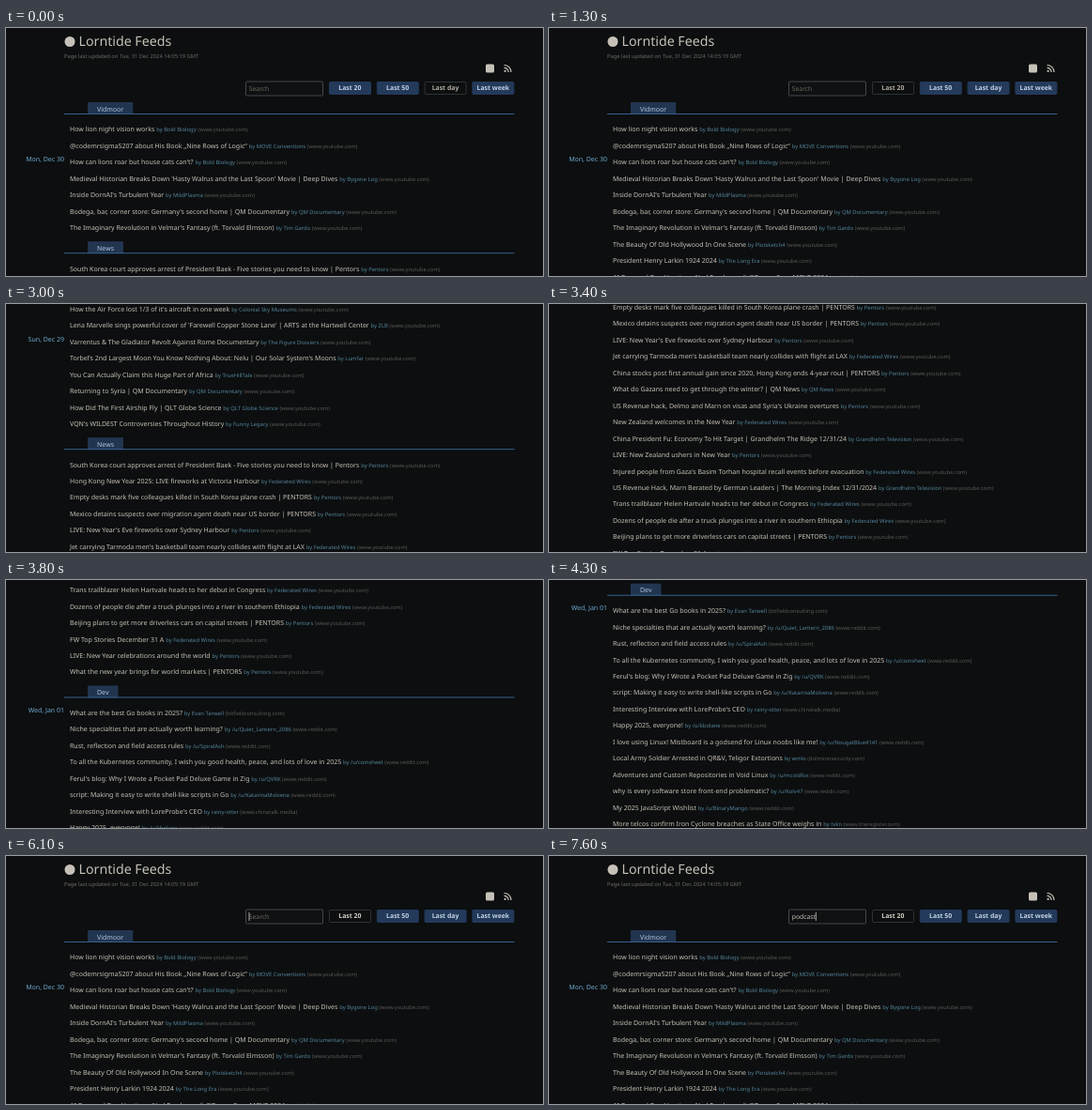
An HTML page for the animation above (8000 ms loop, 572 by 264 pixels).

```html
<!DOCTYPE html>
<html lang="en">
<head>
<meta charset="utf-8">
<title>Feeds</title>
<style>
  html, body { margin: 0; width: 100%; height: 100%; overflow: hidden; background: #0c0e0f; }
  svg { display: block; width: 572px; height: 264px; }
  text { font: 7px "Noto Sans", sans-serif; fill: #c6c1b8; text-rendering: geometricPrecision; white-space: pre; }
  .title { font-size: 14.2px; }
  .updated { font-size: 5.78px; fill: #6e6b66; }
  .author { font-size: 5.87px; fill: #54849a; }
  .site { font-size: 5.72px; fill: #5a5855; }
  .date { fill: #6ea9d0; text-anchor: end; }
  .tab { fill: #22354f; }
  .tab-name { fill: #adc6e0; }
  .rule { fill: #365f8e; }
  .button rect { fill: #233a5b; stroke: #233a5b; }
  .button text { font-size: 6.9px; font-weight: 700; text-anchor: middle; fill: #c3d2e3; }
  .button.active rect { fill: #0c0e0f; stroke: #303437; }
  .button.active text { fill: #d2cec6; }
  .button.hover text { fill: #b2ada4; }
  #field { font-size: 6.8px; }
  #field.empty { fill: #6c6964; }
</style>
</head>
<body>
<svg viewBox="0 0 572 264">
  <g id="page">
    <circle cx="68" cy="14.5" r="5.5" fill="#c6c1b8"/>
    <text class="title" x="77.5" y="19">Lorntide Feeds</text>
    <text class="updated" x="62" y="32">Page last updated on Tue, 31 Dec 2024 14:05:19 GMT</text>
    <rect x="511" y="38.5" width="9" height="9" rx="1.5" fill="#c6c1b8"/>
    <g fill="none" stroke="#c6c1b8" stroke-width="1.2">
      <circle cx="531.6" cy="45.9" r="1.1" fill="#c6c1b8" stroke="none"/>
      <path d="M530.5 42.4a4.5 4.5 0 0 1 4.6 4.6M530.5 39.5a7.5 7.5 0 0 1 7.5 7.5"/>
    </g>
    <rect x="255.5" y="57" width="82" height="15" rx="1" fill="#0e1011" stroke="#45484a"/>
    <text id="field" x="258.8" y="66.5"></text>
    <rect id="caret" y="60" width="0.8" height="9" fill="#d2cec6"/>
    <g id="buttons"></g>
    <g id="day"></g>
    <g id="latest"></g>
  </g>
</svg>
<script>
const $ = id => document.getElementById(id);
const PITCH = 17.46, FIRST = 108, LOOP = 8000;

function add(parent, tag, attrs, content = '') {
  const node = document.createElementNS('http://www.w3.org/2000/svg', tag);
  for (const key in attrs) node.setAttribute(key, attrs[key]);
  node.textContent = content;
  return parent.appendChild(node);
}

// One entry per line: title ~ author ~ site (optional)
const parse = list => list.trim().split('\n').map(line => line.split(' ~ '));

const videos = parse(`
How lion night vision works ~ Bold Biology
@codemrsigma5207 about His Book „Nine Rows of Logic“ ~ MOVE Conventions
How can lions roar but house cats can't? ~ Bold Biology
Medieval Historian Breaks Down 'Hasty Walrus and the Last Spoon' Movie | Deep Dives ~ Bygone Log
Inside DornAI's Turbulent Year ~ MildPlasma
Bodega, bar, corner store: Germany's second home | QM Documentary ~ QM Documentary
The Imaginary Revolution in Velmar's Fantasy (ft. Torvald Elmsson) ~ Tim Gardo
The Beauty Of Old Hollywood In One Scene ~ Plotsketch4
President Henry Larkin 1924 2024 ~ The Long Era
AI-Powered Bug Hunting • Ned Farahmandi @DomavSec • MOVE 2024 ~ MOVE Conventions
The Families That Rule South Korea ~ kelp
Harnessing AI to Clean up Beaches from Plastic Pellets • Linne Dormelen & Fabian Holt ~ MOVE Conventions
How the Air Force lost 1/3 of it's aircraft in one week ~ Colonial Sky Museums
Lena Marvelle sings powerful cover of 'Farewell Copper Stone Lane' | ARTS at the Hartwell Center ~ ZLB
Varrentus & The Gladiator Revolt Against Rome Documentary ~ The Figure Dossiers
Torbel’s 2nd Largest Moon You Know Nothing About: Nelu | Our Solar System's Moons ~ Lumfar
You Can Actually Claim this Huge Part of Africa ~ TrueHillTale
Returning to Syria | QM Documentary ~ QM Documentary
How Did The First Airship Fly | QLT Globe Science ~ QLT Globe Science
VQN's WILDEST Controversies Throughout History ~ Funny Legacy`);

const news = parse(`
South Korea court approves arrest of President Baek - Five stories you need to know | Pentors ~ Pentors
Hong Kong New Year 2025: LIVE fireworks at Victoria Harbour ~ Federated Wires
Empty desks mark five colleagues killed in South Korea plane crash | PENTORS ~ Pentors
Mexico detains suspects over migration agent death near US border | PENTORS ~ Pentors
LIVE: New Year's Eve fireworks over Sydney Harbour ~ Pentors
Jet carrying Tarmoda men's basketball team nearly collides with flight at LAX ~ Federated Wires
China stocks post first annual gain since 2020, Hong Kong ends 4-year rout | PENTORS ~ Pentors
What do Gazans need to get through the winter? | QM News ~ QM News
US Revenue hack, Delmo and Marn on visas and Syria's Ukraine overtures ~ Pentors
New Zealand welcomes in the New Year ~ Federated Wires
China President Fu: Economy To Hit Target | Grandhelm The Ridge 12/31/24 ~ Grandhelm Television
LIVE: New Zealand ushers in New Year ~ Pentors
Injured people from Gaza's Basim Torhan hospital recall events before evacuation ~ Federated Wires
US Revenue Hack, Marn Berated by German Leaders | The Morning Index 12/31/2024 ~ Grandhelm Television
Trans trailblazer Helen Hartvale heads to her debut in Congress ~ Federated Wires
Dozens of people die after a truck plunges into a river in southern Ethiopia ~ Federated Wires
Beijing plans to get more driverless cars on capital streets | PENTORS ~ Pentors
FW Top Stories December 31 A ~ Federated Wires
LIVE: New Year celebrations around the world ~ Pentors
What the new year brings for world markets | PENTORS ~ Pentors`);

const dev = parse(`
What are the best Go books in 2025? ~ Evan Tarwell ~ bitfieldconsulting.com
Niche specialties that are actually worth learning? ~ /u/Quiet_Lantern_2086
Rust, reflection and field access rules ~ /u/SpiralAsh
To all the Kubernetes community, I wish you good health, peace, and lots of love in 2025 ~ /u/coinsheet
Ferul's blog: Why I Wrote a Pocket Pad Deluxe Game in Zig ~ /u/QVRK
script: Making it easy to write shell-like scripts in Go ~ /u/KatarinaMolvena
Interesting Interview with LoreProbe's CEO ~ rainy-otter ~ www.chinatalk.media
Happy 2025, everyone! ~ /u/kbolane
I love using Linux! Mistboard is a godsend for Linux noobs like me! ~ /u/NougatBlue4141
Local Army Soldier Arrested in QR&V, Teligor Extortions ~ wmlo ~ dolmsonsecurity.com
Adventures and Custom Repositories in Void Linux ~ /u/mcoldfox
why is every software store front-end problematic? ~ /u/Kolv47
My 2025 JavaScript Wishlist ~ /u/BinaryMango
More telcos confirm Iron Cyclone breaches as State Office weighs in ~ tvkn ~ www.theregister.com`);

// Draws one feed section and returns the y of the next section's first entry.
function section(parent, name, y, entries, dates = {}, defaultSite = 'www.youtube.com') {
  const tab = add(parent, 'rect', { class: 'tab', x: 87, y: y - 29, height: 13 });
  const label = add(parent, 'text', { class: 'tab-name', x: 97, y: y - 19.4 }, name);
  tab.setAttribute('width', label.getComputedTextLength() + 20);
  add(parent, 'rect', { class: 'rule', x: 62, y: y - 17, width: 479.5, height: 1 });
  entries.forEach(([title, author, site = defaultSite], i) => {
    const base = y + i * PITCH + 2.4;
    const row = add(parent, 'text', { x: 68, y: base }, title + ' ');
    add(row, 'tspan', { class: 'author' }, `by ${author} `);
    add(row, 'tspan', { class: 'site' }, `(${site})`);
    if (dates[i]) add(parent, 'text', { class: 'date', x: 62, y: base - 3 }, dates[i]);
  });
  return y + (entries.length - 1) * PITCH + 43.4;
}

let next = section($('day'), 'Vidmoor', FIRST, videos.slice(0, 7), { 2: 'Mon, Dec 30' });
section($('day'), 'News', next, news.slice(0, 1));

next = section($('latest'), 'Vidmoor', FIRST, videos, { 2: 'Mon, Dec 30', 14: 'Sun, Dec 29' });
next = section($('latest'), 'News', next, news);
section($('latest'), 'Dev', next, dev, { 0: 'Wed, Jan 01' }, 'www.reddit.com');

const buttons = ['Last 20', 'Last 50', 'Last day', 'Last week'].map((name, i) => {
  const x = 344 + i * 50.8;
  const button = add($('buttons'), 'g', {});
  add(button, 'rect', { x: x + .5, y: 57.5, width: 44, height: 13, rx: 1 });
  add(button, 'text', { x: x + 22.4, y: 66.4 }, name);
  return button;
});

// [time, value] pairs
const scrollKeys = [[2200, 0], [2300, 5], [2400, 25], [2500, 65.5], [3000, 312], [3400, 514.5],
  [4000, 818], [4100, 827], [4200, 827], [4300, 825.5], [4400, 360], [4500, 0]];
const hoverKeys = [[0, 2], [300, 1], [500, -1], [600, 0], [5000, -1]];
const typeTimes = [6500, 6600, 6800, 7000, 7300, 7400, 7600];

const held = (keys, t) => keys.filter(([time]) => time <= t).pop()[1];

function scrollAt(t) {
  const i = scrollKeys.findIndex(([time]) => time > t);
  if (i < 1) return 0;
  const [t0, y0] = scrollKeys[i - 1], [t1, y1] = scrollKeys[i];
  return y0 + (y1 - y0) * (t - t0) / (t1 - t0);
}

const start = performance.now();
let drawn = -1;

function draw() {
  // The page repaints ten times a second.
  const t = Math.floor(Math.max(0, performance.now() - start) % LOOP / 100) * 100;
  if (t !== drawn) {
    drawn = t;
    const showLatest = t >= 1300;
    $('day').style.display = showLatest ? 'none' : '';
    $('latest').style.display = showLatest ? '' : 'none';
    $('page').setAttribute('transform', `translate(0 ${-scrollAt(t)})`);

    const hover = held(hoverKeys, t), active = showLatest ? 0 : 2;
    buttons.forEach((button, i) => button.setAttribute('class',
      `button${i === active ? ' active' : ''}${i === hover ? ' hover' : ''}`));

    const typed = 'podcast'.slice(0, typeTimes.filter(time => time <= t).length);
    const field = $('field');
    field.textContent = typed || 'Search';
    field.setAttribute('class', typed ? '' : 'empty');
    $('caret').setAttribute('x', 258.6 + (typed ? field.getComputedTextLength() : 0));
    $('caret').style.display = t >= 6100 ? '' : 'none';
  }
  requestAnimationFrame(draw);
}
draw();
</script>
</body>
</html>
```
